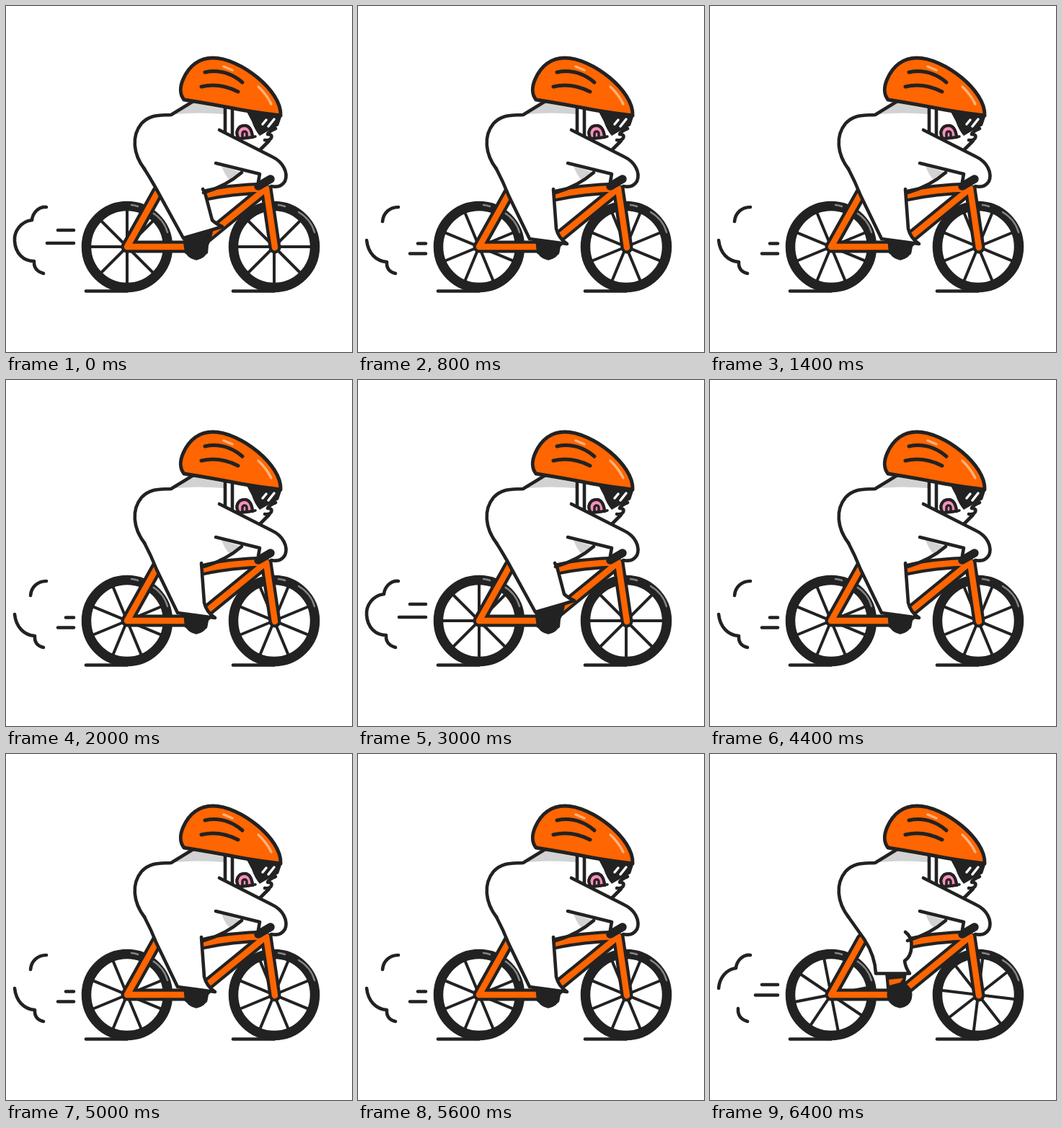
Write an HTML page that moves like this. It is 480x480 px and loops after 6600 ms.

```html
<!DOCTYPE html>
<html lang="en">
<head>
<meta charset="utf-8">
<title>Cyclist</title>
<style>
html, body { margin: 0; width: 100%; height: 100%; overflow: hidden; background: #fff; }
svg { display: block; width: 100%; height: 100%; }
.line { fill: none; stroke: #222; stroke-width: 4.6; stroke-linecap: round; stroke-linejoin: round; }
.white { fill: #fff; }
.shade { fill: #d2d2d2; }
.dark { fill: #222; }
.orange { fill: #ff6500; }
.pink { fill: #ff8fbd; }
.shine { fill: none; stroke: #ffb27c; stroke-width: 3.5; stroke-linecap: round; }
.gleam { fill: none; stroke: #858585; stroke-width: 2.5; stroke-linecap: round; }
.tube { fill: none; stroke-linejoin: round; stroke-linecap: round; }
.pose { visibility: hidden; }
</style>
</head>
<body>
<svg viewBox="0 0 480 480">
  <defs>
    <g id="wheel">
      <circle r="56.500" class="line" style="stroke-width:13.5"/>
      <path class="gleam" d="M6-58Q11-57.500 15-56M34-48Q51-38 56-20"/>
      <path class="line" d="M-57 61.500H0"/>
    </g>
    <path id="spokes" d="M0-52V52M-52 0H52M-37-37L37 37M-37 37L37-37" fill="none" stroke="#222" stroke-width="4"/>
    <path id="tubes" d="M211 257L168 334H262L361 253Q312 254 272 263M361 253L373 335"/>
  </defs>

  <use href="#wheel" x="168" y="334"/>
  <use href="#wheel" x="372" y="334"/>
  <use class="spin" href="#spokes"/>
  <use class="spin" href="#spokes"/>

  <use href="#tubes" class="tube" stroke="#222" stroke-width="17"/>
  <use href="#tubes" class="tube" stroke="#ff6500" stroke-width="8.500"/>
  <circle class="dark" cx="264" cy="336" r="16"/>

  <path class="white" d="M260 132L229 151C213 152 200 150 188 163C174 180 176 205 192 226L225 264L272 255L303 248L327 230L352 199L340 145Z"/>

  <g class="pose">
    <path class="dark" d="M245 320L288 308L285 322L281 332L280 343L264 353L248 343Z"/>
    <path class="white" d="M192 226L246 322L284 311L300 306L286 297L275 255L268 215Z"/>
    <path class="line" d="M192 226Q199 237 207 251L246 322L284 311L300 306Q291 302 286 297L276 259L273 254"/>
    <path class="line" d="M56 279C45 278 37 287 36 297C20 299 11 313 12 326C13 343 24 354 39 354Q38 367 52 371M72 311H94M57 329H94"/>
  </g>
  <g class="pose">
    <path class="dark" d="M246 323L286 329L281 334L279 344L264 353L248 343Z"/>
    <path class="white" d="M192 226Q202 245 209 264L238 323L290 330Q278 322 275 309L271 254L268 215Z"/>
    <path class="line" d="M192 226Q201 243 209 263L238 323L290 330Q278 322 275 309L271 254"/>
    <path class="line" d="M56 279C44 279 35 287 34 299M12 325C14 343 25 354 40 355Q39 368 52 371M83 329.500H94M72 343.500H94"/>
  </g>
  <g class="pose">
    <path class="dark" d="M243 303H273L271 318L280 327L264 353L248 343L245 325Z"/>
    <circle class="dark" cx="263" cy="334" r="17.500"/>
    <path class="orange" d="M248 313L268 311L264 317L249 321Z"/>
    <path class="white" d="M192 226L214 257Q229 280 230 304.500H277Q271 296 270 287C281 280 284 256 271 247L268 215Z"/>
    <path class="line" d="M192 226L214 257Q229 280 230 304.500H277Q271 296 270 287C281 280 284 256 271 247"/>
    <path class="line" d="M56 279C45 278 37 287 36 297C22 299 13 311 12 325M39 353Q38 367 52 371M72 320H94M63 334.500H94"/>
  </g>

  <path class="shade" d="M236 148L258 134L304 143V150Q265 147 236 150Z"/>
  <path class="shade" d="M299 222L327 231L312 243Q304 236 299 222Z"/>
  <path class="line" d="M260 132L229 151C213 152 200 150 188 163C174 180 176 205 192 226M327 231Q305 250 274 259"/>

  <path class="white" d="M304 138H372L374 170L363 178Q370 178 368 184L352 200L304 178Z"/>
  <path class="line" d="M374 170Q364 174 363 178Q370 178 368 183Q366 187 359 186M365 187L352 200"/>
  <path class="line" d="M304 138V177M314 142V181"/>
  <path class="line pink" d="M323 184C317 174 323 166 331 166C338 166 341 174 342 182" style="fill:#fff"/>
  <path class="line pink" d="M323 184C317 174 323 166 331 166C338 166 341 174 342 182Z" style="fill:#ff8fbd;stroke-width:4"/>
  <path class="line" d="M328 182V177C328 173 334 173 334 177V182M322 184.500Q334 184 346 181" style="stroke-width:3.500"/>
  <path class="dark" d="M333 145L383 151L378 166L364 173L352 180Q345 172 341 160Z"/>
  <path d="M356 164L361 158M364 167L372 157" fill="none" stroke="#fff" stroke-width="3.500" stroke-linecap="round"/>

  <path class="orange" d="M247 130C241 123 241 112 246 101C254 83 268 72 287 72C325 72 383 118 381 152Q355 149 326 144Q285 136 247 130Z" stroke="#222" stroke-width="5" stroke-linejoin="round"/>
  <path class="line" d="M276 92Q304 86 328 106M271 112Q296 106 322 119" style="stroke-width:5"/>
  <path class="shine" d="M302 84L314 89M350 112Q361 122 368 136"/>

  <path class="white" d="M296 172L369 209C384 216 393 231 388 243Q381 253 368 250L352 244V233L291 218Z"/>
  <path class="line" d="M296 172L369 209C384 216 392 231 387 243Q381 253 368 250M291 218L352 233L350 244"/>
  <path class="line" d="M350 250L367 240" style="stroke-width:11.500"/>
</svg>
<script>
const step = 200;
const wheels = [
  { x: 168, angles: [0, 22.5, -11] },
  { x: 372, angles: [0, 22.5, 7] }
];
const poses = [...document.querySelectorAll('.pose')];
const spins = [...document.querySelectorAll('.spin')];
let shown = -1;

function draw() {
  const n = Math.floor(performance.now() / step) % poses.length;
  if (n !== shown) {
    shown = n;
    poses.forEach((p, i) => { p.style.visibility = i === n ? 'visible' : 'hidden'; });
    wheels.forEach((w, i) => spins[i].setAttribute('transform', `translate(${w.x} 334) rotate(${w.angles[n]})`));
  }
  requestAnimationFrame(draw);
}
draw();
</script>
</body>
</html>
```
